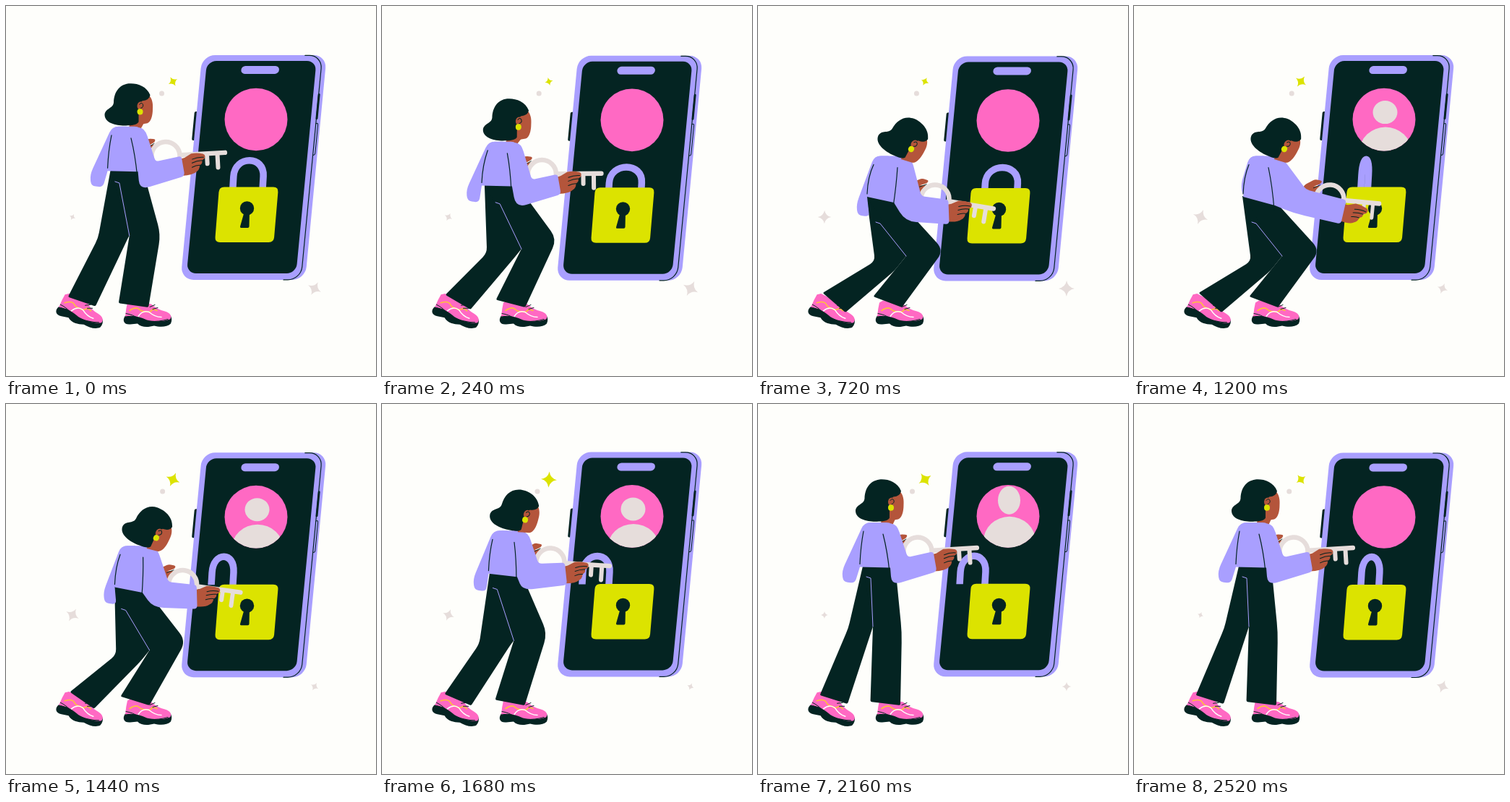
An HTML page with a canvas for the animation above (2640 ms loop, 512 by 512 pixels).

```html
<!DOCTYPE html>
<html lang="en">
<head>
<meta charset="utf-8">
<title>Unlocking the phone</title>
<style>
html, body { margin: 0; width: 100%; height: 100%; overflow: hidden; background: #fefefb; }
canvas { display: block; width: 100vw; height: 100vh; }
</style>
</head>
<body>
<canvas id="stage" width="512" height="512"></canvas>
<script>
const LOOP = 2640, STEP = 120;
const INK = '#042422', LILAC = '#a99fff', PINK = '#ff69c3', LIME = '#dce300',
      PALE = '#e6dddb', SKIN = '#b4553b', WHITE = '#fefefb';
const c = document.getElementById('stage').getContext('2d');

// Timing
const ramp = (t, a, b) => {
  const u = Math.min(1, Math.max(0, (t - a) / (b - a)));
  return u * u * (3 - 2 * u);
};
// Rises from a to b, falls from c to d, repeats every loop
const pulse = (t, a, b, c, d) => {
  t = a + ((t - a) % LOOP + LOOP) % LOOP;
  return ramp(t, a, b) - ramp(t, c, d);
};
const wave = (t, peak, period = LOOP) => Math.cos(2 * Math.PI * (t - peak) / period);

// Drawing helpers
function group(x, y, turn, draw) {
  c.save();
  c.translate(x, y);
  c.rotate(turn * Math.PI / 180);
  draw();
  c.restore();
}
function skewed(slope, y, draw) {
  c.save();
  c.transform(1, 0, -slope, 1, slope * y, 0);
  draw();
  c.restore();
}
function fill(d, color) { c.fillStyle = color; c.fill(new Path2D(d)); }
function line(d, color, width, cap = 'round') {
  c.strokeStyle = color; c.lineWidth = width; c.lineCap = cap; c.lineJoin = 'round';
  c.stroke(new Path2D(d));
}
function oval(x, y, rx, ry, color) {
  c.fillStyle = color;
  c.beginPath(); c.ellipse(x, y, rx, ry, 0, 0, 7); c.fill();
}
function box(x, y, w, h, r, color) {
  c.fillStyle = color;
  c.beginPath(); c.roundRect(x, y, w, h, r); c.fill();
}
// Each point is [x, y, corner]
function poly(points, color) {
  const n = points.length;
  const toward = (p, q) => {
    const len = Math.hypot(q[0] - p[0], q[1] - p[1]) || 1;
    const k = Math.min(p[2] || 0, len / 2) / len;
    return [p[0] + (q[0] - p[0]) * k, p[1] + (q[1] - p[1]) * k];
  };
  c.fillStyle = color;
  c.beginPath();
  points.forEach((p, i) => {
    c.lineTo(...toward(p, points[(i + n - 1) % n]));
    c.quadraticCurveTo(p[0], p[1], ...toward(p, points[(i + 1) % n]));
  });
  c.fill();
}
const off = (p, x, y, corner) => [p[0] + x, p[1] + y, corner];

function star(x, y, r, turn, color) {
  const k = r * .16;
  group(x, y, turn, () => fill(
    `M0 ${-r}Q${k} ${-k} ${r} 0Q${k} ${k} 0 ${r}Q${-k} ${k} ${-r} 0Q${-k} ${-k} 0 ${-r}`, color));
}

function sparkles(t) {
  const rock = 15 + 15 * wave(t, 120, LOOP / 2);
  star(231, 104.5, 8.2 + 2.9 * wave(t, 1800), 38 * wave(t, 1060), LIME);
  star(92, 292, 7.5 + 3.3 * wave(t, 1130), rock, PALE);
  star(427, 391, 8.3 + 3.4 * wave(t, 440), rock, PALE);
  oval(216.5 + 3 * wave(t, 800), 121, 3.5, 3.5, PALE);
}

function phone(t) {
  skewed(.096, 223, () => {
    box(253.5, 146, 6, 40, 2, INK);
    box(256.5, 68, 172.5, 311, 18, LILAC);
    line('M399 68.5H405a18 18 0 0 1 18 18V361a18 18 0 0 1-18 18H399', INK, 1.2);
    box(422, 121, 3, 36, 1.5, INK);
    line('M423 163q3-2 3 2V203q0 4-3 3', INK, 1);
    box(264, 76, 151.5, 294, 13, INK);
    box(312.5, 83, 52.5, 11, 5.5, LILAC);
  });

  const show = pulse(t, 840, 1140, 2160, 2400), hop = pulse(t, 1680, 2160, 2160, 2400);
  oval(346, 157, 43.5, 43.3, PINK);
  c.save();
  c.beginPath(); c.arc(346, 157, 43.4, 0, 7); c.clip();
  oval(347.5, 232 - 85 * show - 12 * hop, 17 - 1.5 * hop, 16 + 3.5 * hop, PALE);
  oval(348, 253 - 51.5 * show - 10 * hop, 36, 34, PALE);
  c.restore();
}

function padlock(t) {
  const x = 314, end = x + 45 - 82 * pulse(t, 900, 1560, 2100, 2720);
  const y = 222 - 10 * pulse(t, 900, 1100, 2560, 2860);
  skewed(.06, 250, () => line(
    `M${x} 265V${y + 22}C${x} ${y - 7.3} ${end} ${y - 7.3} ${end} ${y + 22}V${y + 39}`, LILAC, 9.5, 'butt'));
  poly([[295, 250.5, 7], [377, 250.5, 7], [370.5, 327, 7], [289, 327, 7]], LIME);
  oval(333.5, 280, 9.7, 9.7, INK);
  poly([[330, 284], [337, 284], [336.5, 307, 2], [323.5, 307, 2]], INK);
}

// All joints follow from how far she sinks, leans and reaches
function pose(t) {
  const sink = pulse(t, -100, 540, 1200, 1920);
  const lean = pulse(t, 200, 700, 1240, 2120);
  const reach = pulse(t, 720, 1140, 1200, 1500);
  const bend = Math.sqrt(sink);
  const hip = [167 - 6 * sink + 11 * lean, 224.5 + 42 * sink];
  const neck = [167 + 17 * lean - 4 * reach, 164 + 43.5 * sink];
  const key = [221 + 24 * lean + 26 * reach, 204 + 52 * sink + 11 * lean * sink];
  const cuff = off(key, 24 - 5 * lean, 14 + 4 * lean);
  return { sink, lean, reach, bend, hip, neck, key, cuff,
    waistL: off(hip, -22, -3.5 * lean), waistR: off(hip, 23, 3.5 * lean),
    head: off(neck, 17 + 6 * bend + 5 * lean, -20.5 + 11 * lean),
    headTurn: 28 * lean,
    keyTurn: -3.5 + 13 * lean + 5 * sink * (1 - lean) - 4 * reach,
    cuffTurn: -10 + 8 * lean + 15 * reach };
}

function doorKey(p) {
  group(...p.key.slice(0, 2), p.keyTurn, () => {
    poly([[-40, -6], [-37, -16, 3], [-23, -25, 3], [-13, -24, 3], [-14, -20, 3], [-24, -15],
          [-15, -17, 3], [-13, -13, 3], [-24, 4]], SKIN);
    line('M-24-13L-15-18', INK, .9);
    c.beginPath(); c.arc(0, 0, 19.5, 0, 7);
    c.strokeStyle = PALE; c.lineWidth = 6.5; c.stroke();
    c.scale(1 - .16 * p.reach, 1);
    line('M21 0H82', PALE, 6.5);
    line('M57 2V14M71.5 2V20', PALE, 6);
  });
}

function shoe(x, y, turn) {
  group(x, y, turn, () => {
    fill('M2-2C-3 5 1 11 9 10L19 9C25 15 34 14 42 12C50 14 60 14 65 9Q68 2 64-3L40-2Z', INK);
    fill('M5-20L10-23L38-18Q47-10 57-8C65-6 67 0 64 3C52 7 40 6 32 4C21-1 12-3 2-1Q3-12 5-20Z', PINK);
    line('M3-5Q14-3 20 2C28 6 44 8 61 3', INK, 1);
    line('M8-9Q17-15 21-11T30-8Q36-5 40-11L46-9', '#ffc23a', 1.6);
    line('M20-1Q26-10 35-7Q43 0 52 0', WHITE, 1.5);
    line('M36-14L43-17M40-11L47-13', INK, 1);
  });
}

function legs({ sink, bend, waistL, waistR }) {
  const seam = [159 + 46 * bend, 308 + 38 * bend];
  const backKnee = [125 + 37 * sink, 310 + 43 * bend, 8];
  const frontKnee = [199 + 58 * bend, 316 + 22 * sink * sink, 14];
  poly([waistL, waistR, seam, off(seam, -16 * sink, 20 * sink, 6),
        [124 - 3 * sink, 415 + 9 * sink, 2], [85.5 + 4 * sink, 403 - 6 * sink, 2], backKnee], INK);
  poly([waistL, waistR, frontKnee, [197 + 2 * sink, 417, 2],
        [155.5 + 4 * sink, 412 - 10 * sink, 2], seam], INK);
  line(`M${150 + 13 * sink} ${239 + 60 * sink}l6 2L${seam[0]} ${seam[1]}`, LILAC, 1);
}

function hand(p) {
  group(p.cuff[0], p.cuff[1], p.cuffTurn, () => {
    fill('M-4-10L4-11L14-15Q22-15 30-12Q34-10 31-5L27-3Q28 1 23 3Q22 9 17 11Q12 15-4 13Z', SKIN);
    line('M14-7Q22-9 30-7M13-2Q20-4 27-3M12 4Q18 2 23 3', INK, 1);
  });
}

function head(p) {
  group(p.head[0], p.head[1], p.headTurn, () => {
    fill('M-6-15L12-23C17-18 18-11 17.5-4C17.5 6 15 14 10 16L4 17L-6 19Z', SKIN);
    fill('M14-23C9-36-5-40-16-39C-30-37-36-26-36.5-13C-37-4-49-5-49 5C-48 17-30 20-17 19' +
         'C-9 19-3 17-2 14L-2-8L3-15Q13-16 14-23Z', INK);
    oval(1, -8, 5, 6, SKIN);
    line('M-1-10Q2-14 4-10Q5-6 1-5', INK, 1);
    oval(0, 0, 4, 4.2, LIME);
  });
}

function torso(p) {
  const { lean, reach, neck, cuff } = p;
  const half = 20 + 3 * lean - 3 * reach;
  const backTop = off(neck, -half, 0, 9), frontTop = off(neck, half, 0, 9);
  const hemL = off(p.waistL, 5 * lean - 4, 1), hemR = off(p.waistR, 7 * reach - 7, 2 + 4 * reach);
  const elbow = off(backTop, 6 * lean + 13 * reach - 31, 80 - 28 * reach);
  const armpit = off(frontTop, -14, 16);
  const a = p.cuffTurn * Math.PI / 180, r = 14 + 3 * lean;
  const dx = -r * Math.sin(a), dy = r * Math.cos(a);

  poly([off(p.head, -10, 6), off(p.head, 8, 11), off(frontTop, -1, 4), off(frontTop, -18, 4)], SKIN);
  poly([backTop, off(backTop, 20, 0), hemL, off(elbow, 18, 4, 6), off(elbow, 2, 2, 6),
        off(elbow, 0, -13, 10)], LILAC);
  poly([backTop, frontTop, hemR, hemL], LILAC);
  hand(p);
  poly([armpit, off(frontTop, -10, 1), off(frontTop, 5, 2, 12),
        off(cuff, -38 - 14 * reach, -6 - 16 * lean - 9 * reach, 5),
        off(cuff, -dx, -dy, 4), off(cuff, dx, dy, 5),
        off(cuff, -60 - 8 * reach, 33 - 20 * lean - 11 * reach, 15), hemR], LILAC);
  line(`M${armpit[0]} ${armpit[1]}Q${(armpit[0] + hemR[0]) / 2 + 1} ${(armpit[1] + hemR[1]) / 2} ` +
       `${hemR[0] - 1} ${hemR[1] + 6}`, INK, 1.2);
  line(`M${backTop[0] - 1} ${backTop[1] + 12}Q${hemL[0] + 1} ${hemL[1] - 28} ${hemL[0]} ${hemL[1] - 4}`, INK, 1.2);
  head(p);
}

function draw(t) {
  const p = pose(t);
  c.fillStyle = WHITE;
  c.fillRect(0, 0, 512, 512);
  sparkles(t);
  group(0, 1.7 * wave(t, 620) - .2, 0, () => { phone(t); padlock(t); });
  doorKey(p);
  shoe(71, 417, 17);
  shoe(163, 430.5, 0);
  legs(p);
  torso(p);
}

function tick() {
  draw(Math.floor(performance.now() % LOOP / STEP) * STEP);
  requestAnimationFrame(tick);
}
tick();
</script>
</body>
</html>
```
